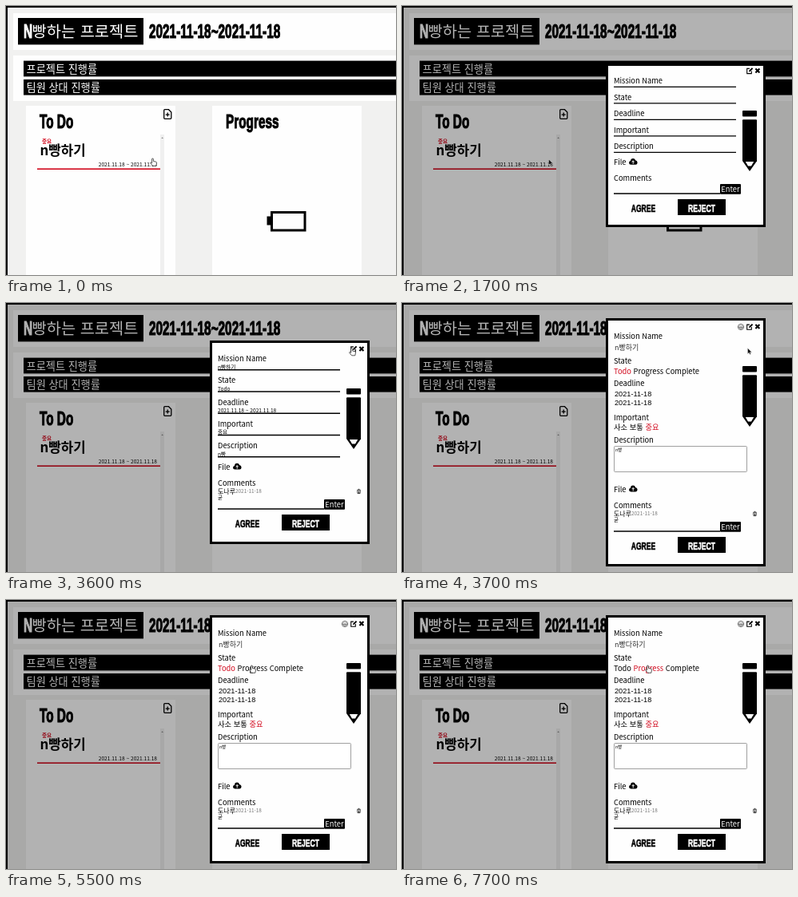
These frames come from a looping animation (488 by 337 pixels, 8000 ms). An HTML page:

```html
<!DOCTYPE html>
<html lang="ko">
<head>
<meta charset="utf-8">
<title>Project board</title>
<style>
html, body { margin: 0; width: 100%; height: 100%; overflow: hidden; background: #f1f1f0; }
svg { display: block; width: 488px; height: 337px; }
text { font-family: "Noto Sans CJK KR", "Noto Sans CJK", "Noto Sans", sans-serif; white-space: pre; }
.display { font-family: "Liberation Sans", Arial, sans-serif; font-weight: 700; stroke-width: .045em; }
.input { font-family: "Liberation Sans", Arial, sans-serif; }
.light { font-weight: 300; }
.bold { font-weight: 700; }
.red { fill: #d20a1e; }
.line { fill: none; stroke: #000; stroke-width: 1.4; }
</style>
</head>
<body>
<svg id="stage" viewBox="0 0 488 337"></svg>
<script>
const LOOP = 8000;
const LABEL = 9.3, SMALL = 6.6, RED = '#d20a1e';

const rect = (x, y, w, h, fill = '#000', extra = '') =>
  `<rect x="${x}" y="${y}" width="${w}" height="${h}" fill="${fill}" ${extra}/>`;
const text = (x, y, size, value, fill = '#000', extra = '') =>
  `<text x="${x}" y="${y}" font-size="${size}" fill="${fill}" ${extra}>${value}</text>`;
// One condensed heavy face for all headings.
const display = (x, y, size, value, fill = '#000', anchor = 'start') =>
  `<text class="display" transform="translate(${x} ${y}) scale(.64 1)" font-size="${size}"
    fill="${fill}" stroke="${fill}" text-anchor="${anchor}">${value}</text>`;
const group = (x, y, content, id = '') =>
  `<g ${id && `id="${id}"`} transform="translate(${x} ${y})">${content}</g>`;
const rule = (y, end = 418) => `<path class="line" d="M265 ${y}H${end}"/>`;
const label = (y, value) => text(265, y, LABEL, value);

const board = () => rect(0, 0, 488, 337, '#f1f1f0')
  + rect(9, 9, 479, 46, '#fefefe') + rect(9, 62, 479, 57, '#fefefe')
  + rect(25, 125, 187, 212, '#fefefe') + rect(258, 125, 187, 212, '#fefefe')
  + rect(15, 15, 157, 33.4)
  + display(22, 40, 24, 'N', '#fff') + text(32.5, 39, 19.8, '빵하는 프로젝트', '#fff', 'class="light"')
  + display(179, 40, 24, '2021-11-18~2021-11-18')
  + rect(22, 68.6, 466, 19.8) + rect(22, 92, 466, 19.6)
  + text(25.5, 84, 13.2, '프로젝트 진행률', '#fff', 'class="light"')
  + text(25.5, 107, 13.2, '팀원 상대 진행률', '#fff', 'class="light"')
  + display(42, 153.2, 24, 'To Do') + display(275, 153.2, 24, 'Progress')
  + `<path d="M198.7 129.7h4.8l3.3 3.3v7.3q0 1-1 1h-7.1q-1 0-1-1v-9.6q0-1 1-1zM202.2 133.6v5M199.7 136.1h5"
      fill="none" stroke="#000" stroke-width="1.3"/>`
  + rect(193, 161, 5, 176, '#f0f0f0') + `<path d="M194.3 166l1.3-1.8 1.3 1.8z" fill="#888"/>`
  + text(45, 171.5, SMALL, '중요', RED, 'class="bold"')
  + text(42.5, 187, 16.8, 'n빵하기', '#000', 'class="bold"')
  + text(189, 201, SMALL, '2021.11.18 ~ 2021.11.18', '#000', 'text-anchor="end"')
  + rect(39, 203.4, 154, 1.6, RED)
  + rect(332.5, 258.5, 41.5, 22.5, 'none', 'stroke="#000" stroke-width="3"')
  + rect(326.5, 263.5, 5, 11);

const cloud = y => group(284, y, `<path d="M2.5 8.6Q0 8.4 0 6.2 0 4.3 2 3.9 2.2.8 5.1.8 7.4.8 8.1 3.1
  10.6 3.5 10.6 6 10.6 8.5 8.2 8.6z"/><path d="M5.2 7.6V4M3.7 5.3 5.2 3.6 6.7 5.3" fill="none" stroke="#fff"/>`);
const icons = y => group(0, y, `<path d="M437.3.4v3.2h-5.6v-6.2h3.2" fill="none" stroke="#000" stroke-width="1.1"/>
  <path d="M434 1.5l.5-2 3.4-3.3 1.4 1.4-3.4 3.3z"/>
  <path d="M442.4-2.6l5 5M447.4-2.6l-5 5" stroke="#000" stroke-width="2.1"/>`);
const pencil = y => group(426, y, rect(0, 0, 18, 7.5, '#000', 'rx="1"')
  + `<path d="M0 12.2q0-1 1-1h16q1 0 1 1v51L9 76 0 63z"/><path d="M3.8 64h10.4L11 69.4H7z" fill="#fff"/>`);
const trash = y => group(441.5, y, `<path d="M-2.3-1.7h4.6M-.8-2.7h1.6M-1.8-.9l.3 3.5h3l.3-3.5M0-.5v2.5"
  fill="none" stroke="#000" stroke-width=".8"/>`);
const frame = (top, height) => rect(256.5, top + 1.5, 197, height - 3, '#fefefe', 'stroke="#000" stroke-width="3"');

const footer = y => group(0, y, rule(30, 398) + rect(398, 18, 26, 12.7, '#000', 'rx="1"')
  + text(411, 27.7, LABEL, 'Enter', '#fff', 'text-anchor="middle"')
  + display(302, 52.7, 13.4, 'AGREE', '#000', 'middle')
  + rect(345, 37, 60, 20) + display(375, 52.7, 13.4, 'REJECT', '#fff', 'middle'));
const comments = y => label(y + .5, 'Comments') + text(265, y + 10.8, 8, '도나루')
  + text(287, y + 10.4, 6.4, '2021-11-18', '#777') + text(265, y + 17.7, SMALL, '굳')
  + trash(y + 8) + footer(y);
const fileRow = y => label(y, 'File') + cloud(y - 9);

const FIELDS = ['Mission Name', 'State', 'Deadline', 'Important', 'Description'];
const VALUES = ['n빵하기', 'Todo', '2021.11.18 ~ 2021.11.18', '중요', 'n빵'];

const emptyView = () => frame(72, 205) + icons(81) + pencil(131)
  + FIELDS.map((name, i) => label(97.2 + i * 20.5, name) + rule(101.4 + i * 20.5)).join('')
  + fileRow(199.2) + label(218.8, 'Comments') + footer(205);

const filledView = () => frame(47, 255) + icons(57.5) + pencil(107)
  + FIELDS.map((name, i) => {
      const y = 73.2 + i * 27.25;
      return label(y, name) + text(265, y + 9.4, SMALL, VALUES[i]) + rule(y + 10.6);
    }).join('')
  + fileRow(209) + comments(228);

const editView = () => frame(19, 311) + icons(29.7) + pencil(79)
  + `<g fill="none" stroke="#555" stroke-width=".9"><circle cx="424" cy="30" r="3.6"/>
     <path d="M421 30.2h6M422 31q2 2.5 4 0M422.6 28.5h.8M424.7 28.5h.8"/></g>`
  + label(45.2, 'Mission Name') + text(266, 58.7, 9, 'n빵하기', '#333', 'id="name"')
  + rect(0, 50.5, .8, 10, '#000', 'id="caret"')
  + label(76, 'State')
  + text(265, 88.8, LABEL, '<tspan id="todo">Todo</tspan> <tspan id="progress">Progress</tspan> Complete')
  + label(104.2, 'Deadline')
  + text(266, 116.6, 9.2, '2021-11-18', '#000', 'class="input"')
  + text(266, 128.4, 9.2, '2021-11-18', '#000', 'class="input"')
  + label(147, 'Important') + text(265, 159, LABEL, '사소 보통 <tspan class="red">중요</tspan>')
  + label(175.2, 'Description')
  + rect(265.5, 179.5, 166, 32, '#fff', 'stroke="#888" stroke-width=".8" rx="1"')
  + text(267, 186, 5.3, 'n빵')
  + fileRow(236.8) + comments(256);

const pointers = {
  hand: `<path d="M-.9.9Q-.9 0 0 0T.9.9V3.4L4.4 4.3Q5.2 4.6 5 5.6L4.3 9.3H.1L-2.8 5.8Q-3.1 4.9-2.1 5L-.9 5.8z"
    fill="#fff" stroke="#222" stroke-width=".75"/>`,
  arrow: `<path d="M0 0V7.2L1.7 5.7 2.8 8 4 7.4 3 5.2H5.2z" fill="#111" stroke="#eee" stroke-width=".4"/>`,
  beam: `<path d="M-1.6-4.5Q0-4.5 0-3.5 0-4.5 1.6-4.5M0-3.5v7M-1.6 4.5Q0 4.5 0 3.5 0 4.5 1.6 4.5"
    fill="none" stroke="#333" stroke-width=".8"/>`
};

document.getElementById('stage').innerHTML = board() + rect(0, 0, 488, 337, '#000', 'id="shade" opacity=".3"')
  + rect(0, 0, 2, 337) + rect(0, 0, 488, 2)
  + group(0, 0, emptyView(), 'empty') + group(0, 0, filledView(), 'filled') + group(0, 0, editView(), 'edit')
  + `<g id="cursor">${Object.entries(pointers).map(([id, shape]) => group(0, 0, shape, id)).join('')}</g>`;

// Step tables: [start time, value].
const views = [[0, ''], [1700, 'empty'], [2100, 'filled'], [3700, 'edit']];
const kinds = [[0, 'hand'], [1700, 'arrow'], [2800, 'hand'], [3700, 'arrow'], [4300, 'beam'], [4800, 'arrow'], [5000, 'hand']];
const names = [[0, 'n빵하기'], [5600, 'n빵ㄷ하기'], [5800, 'n빵다하기']];
const carets = [[0, 0], [4500, 1], [5100, 0], [5600, 1], [6100, 0], [6400, 1], [6800, 0], [7000, 1], [7400, 0]];
// Pointer path: [time, x, y].
const path = [[0, 183.5, 191], [1600, 183.5, 191], [1700, 183.5, 192], [2100, 183.5, 192], [2900, 432.5, 56],
  [3100, 432.5, 56.5], [3700, 432.5, 56.5], [4300, 281, 55], [4700, 281, 55], [5100, 307.5, 82], [LOOP, 307.5, 82]];

const $ = id => document.getElementById(id);
const show = (id, on) => { $(id).style.display = on ? '' : 'none'; };
const at = (steps, t) => steps.filter(([start]) => start <= t).pop()[1];
const ease = p => p * p * (3 - 2 * p);

function position(t) {
  const next = path.findIndex(([time]) => time > t);
  const [t0, x0, y0] = path[next - 1], [t1, x1, y1] = path[next];
  const p = ease((t - t0) / (t1 - t0));
  return [x0 + (x1 - x0) * p, y0 + (y1 - y0) * p];
}

function draw(now) {
  const t = Math.floor((now % LOOP) / 100) * 100;
  const view = at(views, t), kind = at(kinds, t), name = at(names, t), picked = t >= 7700;
  show('shade', view);
  ['empty', 'filled', 'edit'].forEach(id => show(id, id === view));
  Object.keys(pointers).forEach(id => show(id, id === kind));
  $('cursor').setAttribute('transform', `translate(${position(t)})`);
  $('name').textContent = name;
  $('caret').setAttribute('x', name.length > 4 ? 288.2 : 280);
  show('caret', at(carets, t));
  $('todo').setAttribute('class', picked ? '' : 'red');
  $('progress').setAttribute('class', picked ? 'red' : '');
}

const start = performance.now();
function tick() {
  draw(performance.now() - start);
  requestAnimationFrame(tick);
}
tick();
</script>
</body>
</html>
```
